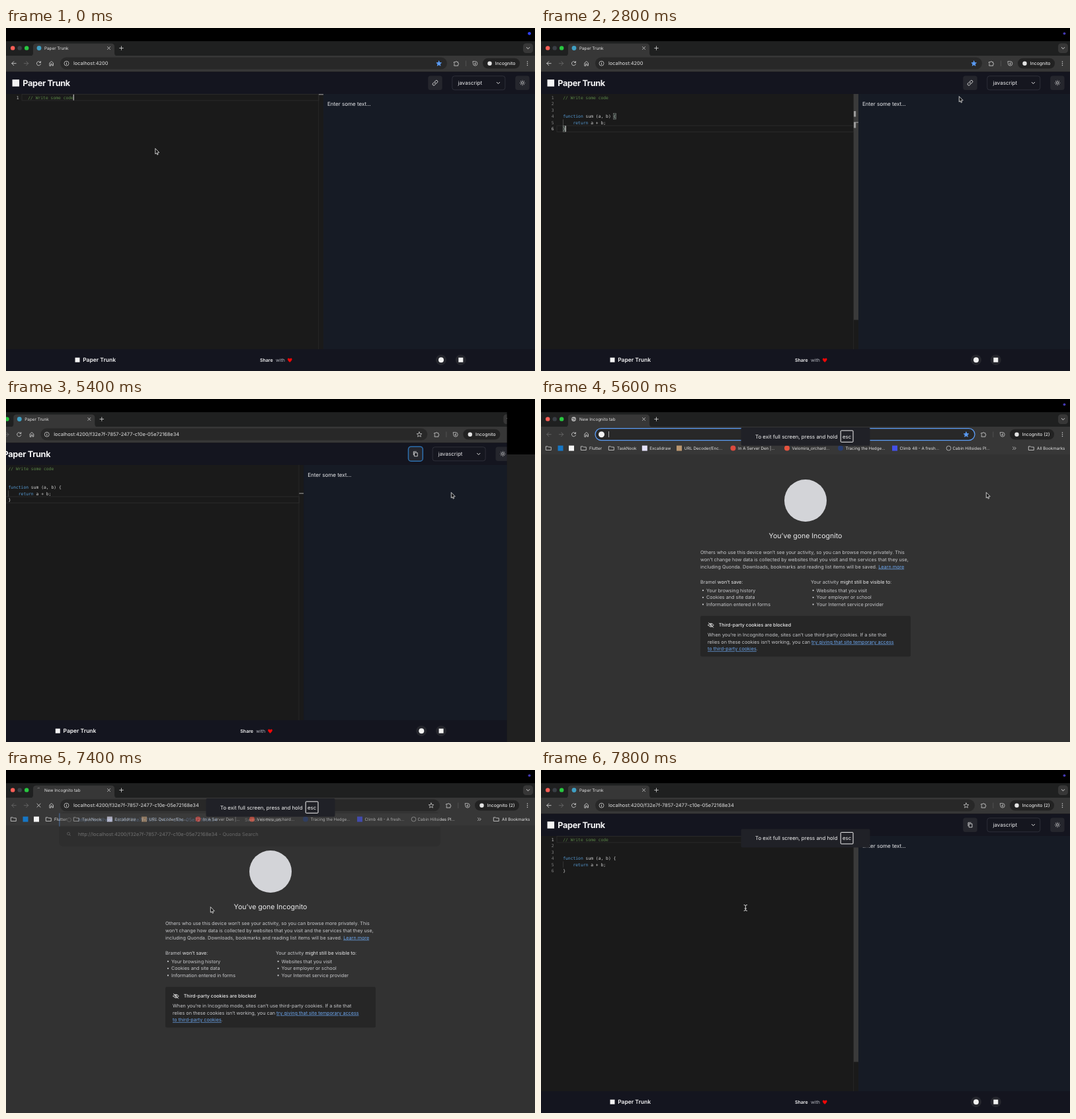
Animation, 800 px wide and 520 px high, one loop 8 s. Source, as an HTML page:

```html
<!DOCTYPE html>
<html lang="en">
<head>
<meta charset="utf-8">
<title>Paper Trunk</title>
<style>
html, body { margin: 0; width: 100%; height: 100%; overflow: hidden; background: #000; }
svg { display: block; width: 800px; height: 520px; }
text { font-family: Inter, "Noto Sans", sans-serif; white-space: pre; text-rendering: geometricPrecision; }
.mono { font-family: "DejaVu Sans Mono", monospace; font-size: 6.35px; }
</style>
</head>
<body>
<svg id="stage" viewBox="0 0 800 520"></svg>
<script>
const STEP = 200, LOOP = 8000;
const APP = 'Paper Trunk', HOST = 'localhost:4200';
const LINK = HOST + '/f32e7f-7857-2477-c10e-05e72168e34';
const CODE = '// Write some code\n\n\nfunction sum (a, b) {\n    return a + b;\n}';
const CH = 3.823, LH = 9.525, TOP = 100.4;

// Characters typed at each step, then held
const TYPED = [18, 20, 23, 27, 31, 34, 34, 38, 42, 47, 52, 57, 60, 62];
// Pointer: step, x, y
const PATH = [[0, 225.5, 183], [11, 225.5, 183], [12, 420, 150], [13, 560, 118], [14, 632, 104],
  [15, 645, 92], [16, 648, 84], [20, 648, 84], [22, 763, 73], [23, 715, 79], [24, 650, 84],
  [25, 650, 84], [26, 673, 142], [29, 673, 142], [32, 400, 196], [33, 309, 208], [39, 309, 208]];

// Drawing helpers
const rect = (x, y, w, h, fill, r = 0, more = '') =>
  `<rect x="${x}" y="${y}" width="${w}" height="${h}" rx="${r}" fill="${fill}" ${more}/>`;
const disc = (x, y, r, fill, more = '') => `<circle cx="${x}" cy="${y}" r="${r}" fill="${fill}" ${more}/>`;
const ring = (x, y, r, color, w = .8) => disc(x, y, r, 'none', `stroke="${color}" stroke-width="${w}"`);
const square = (x, y, s, fill) => rect(x - s / 2, y - s / 2, s, s, fill);
// Text is placed by the middle of its capitals
const text = (x, y, size, str, fill = '#e3e3e3', more = '') =>
  `<text x="${x}" y="${y + size * .36}" font-size="${size}" fill="${fill}" ${more}>${str}</text>`;
const icon = (x, y, d, color = '#c7c7c7', w = .9, fill = 'none') =>
  `<path transform="translate(${x} ${y})" d="${d}" fill="${fill}" stroke="${color}" stroke-width="${w}" stroke-linecap="round" stroke-linejoin="round"/>`;
const group = (body, more) => `<g ${more}>${body}</g>`;

const CROSS = 'M-2-2L2 2M2-2L-2 2';
const DOWN = 'M-2.2-1.1L0 1.1L2.2-1.1';
const FOLDER = 'M-3.8-2.7h2.7l1 1h3.9v4.6h-7.6z';
const ARROW = 'M3.2 0H-3.2M-.2-3L-3.2 0L-.2 3';
const STAR = 'M' + Array.from({ length: 10 }, (_, i) => {
  const r = i % 2 ? 1.8 : 4, a = i * Math.PI / 5;
  return (r * Math.sin(a)).toFixed(2) + ' ' + (-r * Math.cos(a)).toFixed(2);
}).join('L') + 'z';

function tabStrip(title, favicon) {
  const lights = ['#ff5f57', '#3a3f46', '#28c840'].map((c, i) => disc(10.2 + i * 10.5, 30.4, 3.2, c)).join('');
  const marks = {
    app: disc(50, 30.5, 3.4, '#3f9fc4'),
    globe: disc(49.5, 30.5, 3.4, '#b4b4b4') + icon(49.5, 30.5, 'M-2.2-.8H.8M-.5 1.4L2.2.3', '#444'),
    wait: icon(49.5, 30.5, 'M-1.5-3A3.4 3.4 0 0 1 1-3.2', '#888', .8)
  };
  return rect(0, 20, 800, 23, '#1f2020') + lights
    + '<path d="M37 42.5Q41 42 41 38V28Q41 23.5 46 23.5H159Q164 23.5 164 28V38Q164 42 168 42.5Z" fill="#373737"/>'
    + marks[favicon] + text(58, 30.6, 6.35, title)
    + icon(155.5, 30.5, CROSS) + icon(174.5, 30.5, 'M-2.8 0H2.8M0-2.8V2.8')
    + rect(782, 23.3, 15, 14.8, '#373737', 4.5) + icon(789.5, 30.6, DOWN, '#ddd', 1);
}

function toolbar({ url, second, focus, starred, history, loading, caret }) {
  const dx = second ? -11.7 : 0, right = second ? 656 : 667;
  const chip = second ? 709 : 721;
  let s = rect(0, 42, 800, 24.6, '#373737')
    + icon(12, 53.7, ARROW, history ? '#d0d0d0' : '#686868')
    + group(icon(0, 0, ARROW, '#686868'), 'transform="translate(30.5 53.7) scale(-1 1)"')
    + (loading ? icon(49.5, 53.7, 'M-2.6-2.6L2.6 2.6M2.6-2.6L-2.6 2.6')
      : icon(49.5, 53.7, 'M2.6-1.7A3.1 3.1 0 1 0 3 1M3-3.1V-1.2H1'))
    + icon(68.7, 53.8, 'M-2.8 3.2V-.8L0-3.2L2.8-.8V3.2H1V.6H-1V3.2z')
    + rect(82, 44.6, right - 82, 18, '#282828', 9,
      focus ? 'stroke="#5b9cf5" stroke-width="1.3"' : '');
  s += focus ? disc(91.5, 53.7, 4.5, '#f1f1f1')
    : ring(91.5, 53.7, 3.5, '#d0d0d0') + icon(91.5, 53.7, 'M0-.3V1.6M0-1.7v.05', '#d0d0d0');
  s += text(102, 53.7, 7.4, url);
  if (caret) s += rect(caret, 49, .7, 9, '#e3e3e3');
  s += icon(second ? 643 : 654.7, 54, STAR, starred ? '#5b9cf5' : '#c7c7c7', .8, starred ? '#5b9cf5' : 'none')
    + icon(681 + dx, 53.8, 'M-3.2-2.2H-1A1 1 0 0 1 1-2.2H2.6V-.4A1 1 0 0 1 2.6 1.6V3.4H-3.2V1.4A1 1 0 0 0-3.2-.4z')
    + rect(695.3 + dx, 49.5, .6, 8.5, '#626262')
    + icon(709.7 + dx, 53.8, 'M-3.4-3.2H0A3.3 3.3 0 1 1-3.4 0zM.6-1.8L-1.2.4H1L-.6 2.2', '#c7c7c7', .8)
    + rect(chip, 45.8, (second ? 776 : 777) - chip, 15.8, '#222', 7.9)
    + disc(chip + 10.5, 53.8, 3.2, '#e3e3e3')
    + text(chip + 18.8, 53.8, 6.85, second ? 'Incognito (2)' : 'Incognito', '#e3e3e3', 'font-weight="500"');
  for (const y of [-2.8, 0, 2.8]) s += disc(788.5, 53.8 + y, .75, '#d0d0d0');
  return s;
}

function editor({ typed, line, caret, brackets, slider, mark }) {
  const rows = typed.split('\n');
  const rowY = i => TOP + i * LH;
  const paint = str => str.startsWith('//') ? `<tspan fill="#5a8648">${str}</tspan>`
    : str.replace(/function|return/, '<tspan fill="#569cd6">$&</tspan>');
  let s = rect(0, 100, 480, 387, '#1a1a1a')
    + rect(24, rowY(line), 449, LH, 'none', 0, 'stroke="#2b2b2b" stroke-width=".9"');
  if (brackets) for (const [c, r] of [[20, 3], [0, 5]])
    s += rect(33.2 + c * CH, rowY(r) + .3, CH, LH - .6, '#24302a', 0, 'stroke="#858585" stroke-width=".6"');
  rows.forEach((row, i) => {
    const y = (rowY(i) + 7.1).toFixed(2);
    s += `<text class="mono" x="19.7" y="${y}" text-anchor="end" fill="${i === line ? '#c6c6c6' : '#808080'}">${i + 1}</text>`
      + `<text class="mono" x="33.2" y="${y}" fill="#d4d4d4">${paint(row)}</text>`;
    if (row.startsWith('    ')) s += rect(33.2, rowY(i), .6, LH, line === i || line === 5 ? '#666' : '#444');
  });
  if (caret != null) s += rect(33.2 + caret * CH - .3, rowY(line) + .3, 1, LH - .6, '#e0e0e0');
  s += rect(472.3, 100, .7, 387, '#2b2b2b');
  if (slider) s += rect(473, 100, 7, 342.5, '#3a3a3a');
  if (brackets) s += rect(473, 126, 3.2, 8.5, '#999') + rect(473, 143, 3.2, 8.5, '#999');
  if (mark) s += rect(473, line ? 142.6 : 100.3, 7, 1, '#a8a8a8');
  return s;
}

function page({ copy, ringed, code }) {
  const btn = '#25262d';
  let s = rect(0, 66.5, 800, 453.5, '#14151f') + editor(code)
    + rect(480, 100, 320, 387, '#161b25')
    + square(14.8, 83.4, 10.5, '#f4f4f4')
    + text(25.2, 83.6, 12.7, APP, '#f4f4f5', 'font-weight="700" letter-spacing="-.32"')
    + rect(638.3, 72.4, 21.4, 21.6, btn, 3.5);
  if (ringed) s += rect(638.2, 72.2, 21.8, 22, 'none', 4, 'stroke="#2d6fae" stroke-width="1.5"');
  s += copy
    ? icon(649, 83.2, 'M-1.4-1.6H3V3.6H-1.4zM-3 1.6V-3.4H1.2', '#e8e8e8', .8)
    : icon(649, 83.2, 'M-.8.8A1.9 1.9 0 0 0 1.9.8L3.3-.6A1.9 1.9 0 0 0 .6-3.3L-.2-2.5M.8-.8A1.9 1.9 0 0 0-1.9-.8L-3.3.6A1.9 1.9 0 0 0-.6 3.3L.2 2.5', '#e8e8e8', .85);
  s += rect(674.8, 72.8, 80, 21, '#15161f', 3.5, 'stroke="#353741" stroke-width=".8"')
    + text(683.5, 83.2, 8, 'javascript', '#ececee')
    + icon(744.4, 83.4, DOWN, '#e0e0e0', 1)
    + rect(770.2, 72.4, 21.4, 21.6, btn, 3.5) + ring(781, 83.2, 1.7, '#e8e8e8');
  for (let i = 0; i < 8; i++)
    s += group(rect(-.35, -4.1, .7, 1.2, '#e8e8e8'), `transform="translate(781 83.2) rotate(${i * 45})"`);
  return s + text(486, 115.2, 8.1, 'Enter some text...', '#e6e7ea', 'letter-spacing="-.05"')
    + square(108, 503.2, 7, '#f4f4f4')
    + text(116.2, 503.4, 8.5, APP, '#f4f4f5', 'font-weight="600"')
    + text(384, 503.4, 7, 'Share', '#f4f4f5', 'font-weight="600"')
    + text(408, 503.4, 7, 'with', '#b9bac2')
    + icon(429.2, 503.4, 'M0 3C-6-1-2.2-4.6 0-1.7C2.2-4.6 6-1 0 3z', '#f00808', .3, '#f00808')
    + disc(658, 503.2, 8, btn) + disc(658, 503.2, 4, '#f2f2f2')
    + disc(687.8, 503.2, 8, btn) + square(687.8, 503.2, 7, '#f2f2f2');
}

const BOOKMARKS = [
  ['f', 11.5], ['s', 29.5, '', '#1677c5'], ['s', 46, '', '#f5f5f5'],
  ['f', 64.5, 'Flutter'], ['f', 106.5, 'TaskNook'], ['s', 156.8, 'Excalidraw', '#e4e2fb'],
  ['s', 209, 'URL Decoder/Enc...', '#b99670'], ['c', 290.5, 'In A Server Den |...', '#dc4a3e'],
  ['c', 372, 'Velomira_orchard...', '#e5533f'], ['c', 453, 'Tracing the Hedge...', '#283d70'],
  ['s', 535, 'Climb 48 - A fresh...', '#4450e6'], ['g', 616.5, 'Cabin Hillsides Pl...'],
  ['f', 741.5, 'All Bookmarks']];

function newTab() {
  const grey = '#c8c9cc', light = '#ededee', blue = '#6ca6ee';
  let s = rect(0, 66, 800, 454, '#323232') + rect(0, 66, 800, 18, '#373737');
  for (const [kind, x, label, color] of BOOKMARKS) {
    s += kind === 'f' ? icon(x, 74.6, FOLDER) : kind === 's' ? square(x, 74.6, 8, color)
      : kind === 'c' ? disc(x, 74.6, 4, color) : ring(x, 74.6, 3.4, '#c7c7c7');
    if (label) s += text(x + (kind === 'f' ? 8.6 : kind === 'g' ? 6 : 7.5), 74.6, 6.25, label);
  }
  s += icon(715.7, 74.7, 'M-2.2-2L-.2 0L-2.2 2M.5-2L2.5 0L.5 2', '#d0d0d0', .8)
    + disc(400, 154, 32, '#d3d4d8')
    + text(400, 207.3, 10.5, 'You’ve gone Incognito', light, 'text-anchor="middle"');
  const put = (x, y, str, fill = grey) => { s += text(x, y, 7.23, str, fill); };
  const link = str => `<tspan fill="${blue}" text-decoration="underline">${str}</tspan>`;
  const strong = str => `<tspan fill="${light}">${str}</tspan>`;
  put(241, 232.8, 'Others who use this device won’t see your activity, so you can browse more privately. This');
  put(241, 243.4, 'won’t change how data is collected by websites that you visit and the services that they use,');
  put(241, 254, 'including Quonda. Downloads, bookmarks and reading list items will be saved. ' + link('Learn more'));
  put(241, 277.3, 'Bramel ' + strong('won’t save:'));
  put(408, 277.3, 'Your activity ' + strong('might still be visible to:'));
  const list = (x, items) => items.forEach((item, i) => {
    const y = 290 + i * 10.6;
    s += disc(x - 5, y + .2, 1.1, grey);
    put(x, y, item);
  });
  list(250, ['Your browsing history', 'Cookies and site data', 'Information entered in forms']);
  list(416.6, ['Websites that you visit', 'Your employer or school', 'Your Internet service provider']);
  s += rect(241, 328.8, 318, 61.6, '#262626', 2.5)
    + icon(257, 342.8, 'M-4.3 0Q0-5.4 4.3 0Q0 5.4-4.3 0M-3.6-3.6L3.6 3.6', '#e6e6e6')
    + ring(257, 342.8, 1.4, '#e6e6e6', .8)
    + text(268.7, 342.9, 7.15, 'Third-party cookies are blocked', light, 'font-weight="500"');
  put(252, 357.6, 'When you’re in Incognito mode, sites can’t use third-party cookies. If a site that');
  put(252, 368.2, 'relies on these cookies isn’t working, you can ' + link('try giving that site temporary access'));
  put(252, 378.8, link('to third-party cookies') + '.');
  return s;
}

const suggestions = opacity => group(
  rect(80, 64, 577, 52, '#282828', 7) + rect(80, 65.5, 577, 20, '#404040')
  + rect(80, 65.5, 1.6, 20, '#5b9cf5')
  + ring(95.5, 75.5, 3, '#bbb') + text(109, 75.6, 7.4, 'http://' + LINK, '#8db8f5')
  + text(361, 75.6, 6.8, 'Switch to this tab', '#ddd')
  + ring(94.5, 96.5, 2, '#bbb') + icon(96.5, 98.5, 'M-.5-.5L1 1', '#bbb')
  + text(109, 97.2, 7.4, `http://${LINK} <tspan fill="#c4c4c4">- Quonda Search</tspan>`, '#e3e3e3'),
  `opacity="${opacity}"`);

const toast = y => group(
  rect(302.5, -13.8, 195, 27.8, '#202127', 2)
  + text(324, 0, 7.83, 'To exit full screen, press and hold', '#f3f3f3')
  + rect(453.2, -8.8, 18.8, 17.4, 'none', 1, 'stroke="#f3f3f3" stroke-width="1"')
  + text(462.6, 0, 7.8, 'esc', '#f3f3f3', 'text-anchor="middle"'),
  `transform="translate(0 ${y})"`);

function pointer(k) {
  if (k > 1 && k < 12) return '';
  if (k === 39) {
    const beam = 'M-2.2-4.5Q0-4.5 0-3Q0-4.5 2.2-4.5M0-3V3M-2.2 4.5Q0 4.5 0 3Q0 4.5 2.2 4.5M-1.2 1H1.2';
    return icon(309.3, 209, beam, '#d8d8d8', 1);
  }
  const i = PATH.findIndex(p => p[0] >= k);
  const b = PATH[i], a = PATH[i - 1] || b, f = b === a ? 0 : (k - a[0]) / (b[0] - a[0]);
  return icon(a[1] + (b[1] - a[1]) * f, a[2] + (b[2] - a[2]) * f,
    'M.3 0V8L2.1 6.5L3.3 9.2L4.6 8.6L3.4 6L5.8 5.8z', '#f0f0f0', .8, '#111');
}

function codeState(k) {
  if (k >= 38) return { typed: k === 38 ? CODE.slice(0, 18) : CODE, line: 0, slider: k === 39 };
  const n = TYPED[Math.min(k, TYPED.length - 1)];
  const before = CODE.slice(0, n).split('\n');
  const tail = n === 42 ? '}' : n > 42 && n < 62 ? '\n}' : '';
  const focused = k < 18;
  return {
    typed: CODE.slice(0, n) + tail, line: before.length - 1, mark: true,
    caret: focused ? before.at(-1).length : null,
    brackets: focused && n === 62, slider: k >= 12 && k < 16
  };
}

function frame(k) {
  const shared = k >= 18, swipe = k === 27, fresh = k >= 28 && k < 38, pasted = k >= 33;
  let s = rect(0, 0, 800, 520, '#000');
  if (fresh) {
    const loading = k === 37;
    s += tabStrip('New Incognito tab', loading ? 'wait' : 'globe')
      + toolbar({ url: pasted ? LINK : '', second: true, focus: !pasted, loading,
        starred: !pasted, caret: pasted ? (loading ? 0 : 295) : 102 })
      + newTab();
    if (pasted) s += suggestions(loading ? .35 : 1);
  } else {
    const win = tabStrip(APP, k === 38 ? 'wait' : 'app')
      + toolbar({ url: shared ? LINK : HOST, second: k >= 38, starred: !shared, history: true })
      + page({ copy: shared, ringed: k >= 25 && k < 28, code: codeState(k) });
    s += group(win, `transform="translate(${swipe ? -29.7 : 0} 0)"`);
  }
  s += disc(791.5, 8.3, k ? 1.9 : 2.4, k ? '#4338b0' : '#2f40f0');
  if (swipe) s += rect(757.6, 0, 42.4, 84, '#000') + rect(757.6, 84, 42.4, 436, '#202020');
  if (k >= 28) s += toast(fresh ? 56.7 : 103.4);
  return s + pointer(k);
}

const stage = document.getElementById('stage');
let shown = -1;
function tick() {
  const k = Math.floor(performance.now() % LOOP / STEP);
  if (k !== shown) stage.innerHTML = frame(shown = k);
  requestAnimationFrame(tick);
}
tick();
</script>
</body>
</html>
```
